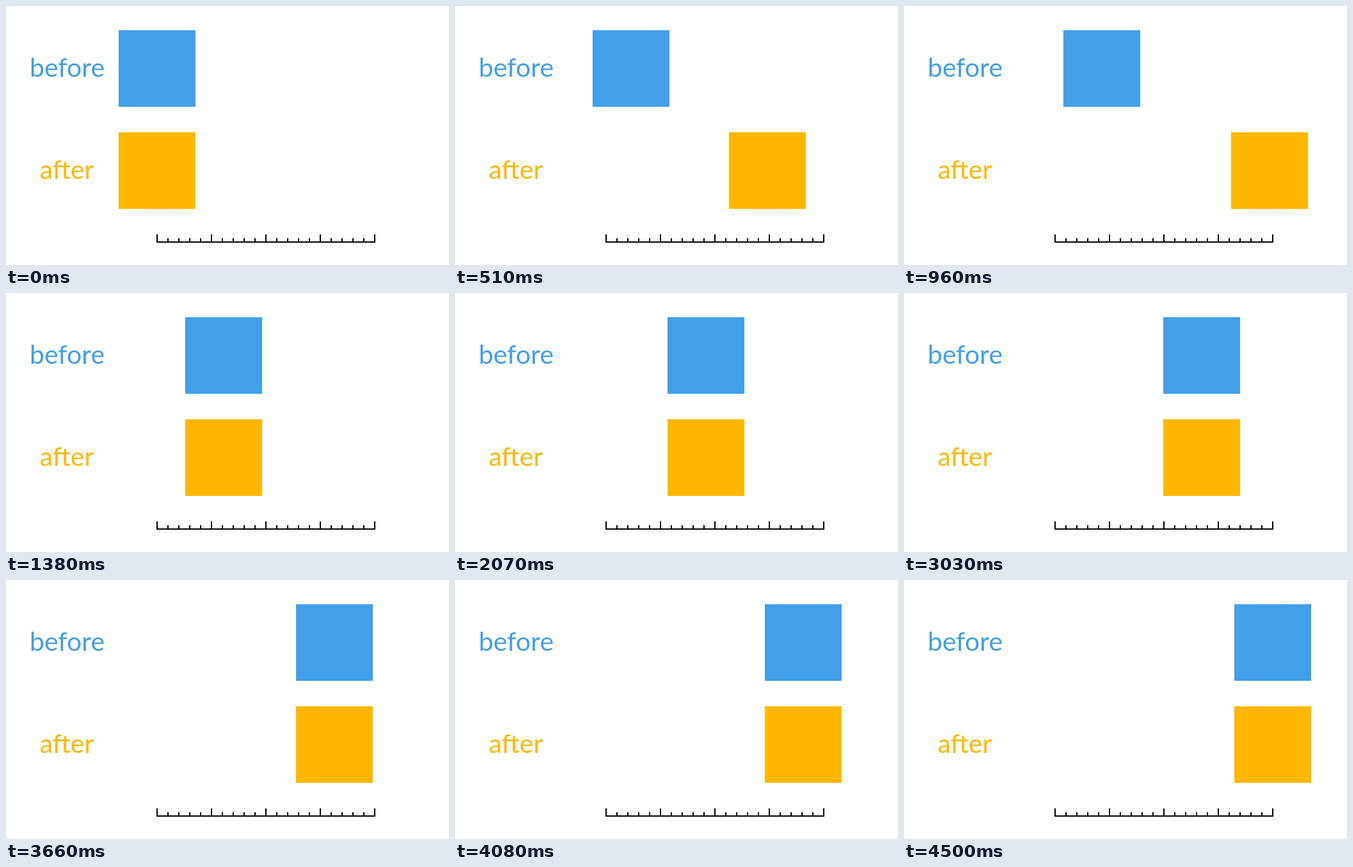
An HTML page with a canvas that plays this animation: 692x406 px, repeating every 7650 ms.

```html
<!DOCTYPE html>
<html lang="en">
<head>
<meta charset="utf-8">
<title>Before and after</title>
<style>
html, body { margin: 0; width: 100%; height: 100%; overflow: hidden; background: #fff; }
canvas { display: block; }
</style>
</head>
<body>
<canvas id="stage" width="692" height="406"></canvas>
<script>
const ctx = document.getElementById('stage').getContext('2d');
const LOOP = 7650, STEP = 30;
const SLOW = 4500, QUICK = 1125, QUICK_DELAY = 10;
const START = 176, TRAVEL = 340, SIZE = 120;
const BLUE = '#429fe8', YELLOW = '#ffb702';

// Cubic Bezier easing with control points (.25, .1) and (.25, 1)
function ease(x) {
  const curve = (s, a, b) => 3 * (1 - s) * (1 - s) * s * a + 3 * (1 - s) * s * s * b + s * s * s;
  let lo = 0, hi = 1;
  for (let i = 0; i < 24; i++) {
    const mid = (lo + hi) / 2;
    if (curve(mid, 0.25, 0.25) < x) lo = mid; else hi = mid;
  }
  return curve(lo, 0.1, 1);
}

const linear = t => Math.min(t / SLOW, 1);

// The quick eased run hides the slow one until it ends
function layered(t) {
  const u = Math.max(0, t - QUICK_DELAY) / QUICK;
  return u < 1 ? ease(u) : linear(t);
}

function row(label, color, x, y, progress) {
  ctx.fillStyle = color;
  ctx.fillText(label, x, y + 73);
  ctx.fillRect(Math.round(START + TRAVEL * progress), y, SIZE, SIZE);
}

function ruler() {
  ctx.fillStyle = '#000';
  ctx.fillRect(235, 369, TRAVEL + 2, 2);
  for (let i = 0; i <= 20; i++) {
    const height = i % 5 ? 7 : 13;
    ctx.fillRect(235 + i * 17, 371 - height, 2, height);
  }
}

function draw(now) {
  const t = Math.floor((now % LOOP) / STEP) * STEP;
  ctx.fillStyle = '#fff';
  ctx.fillRect(0, 0, 692, 406);
  ctx.font = '41px Lato, sans-serif';
  ctx.textAlign = 'center';
  row('before', BLUE, 95.5, 38, linear(t));
  row('after', YELLOW, 95, 198, layered(t));
  ruler();
}

const origin = performance.now();
function tick() {
  draw(performance.now() - origin);
  requestAnimationFrame(tick);
}
tick();
</script>
</body>
</html>
```
